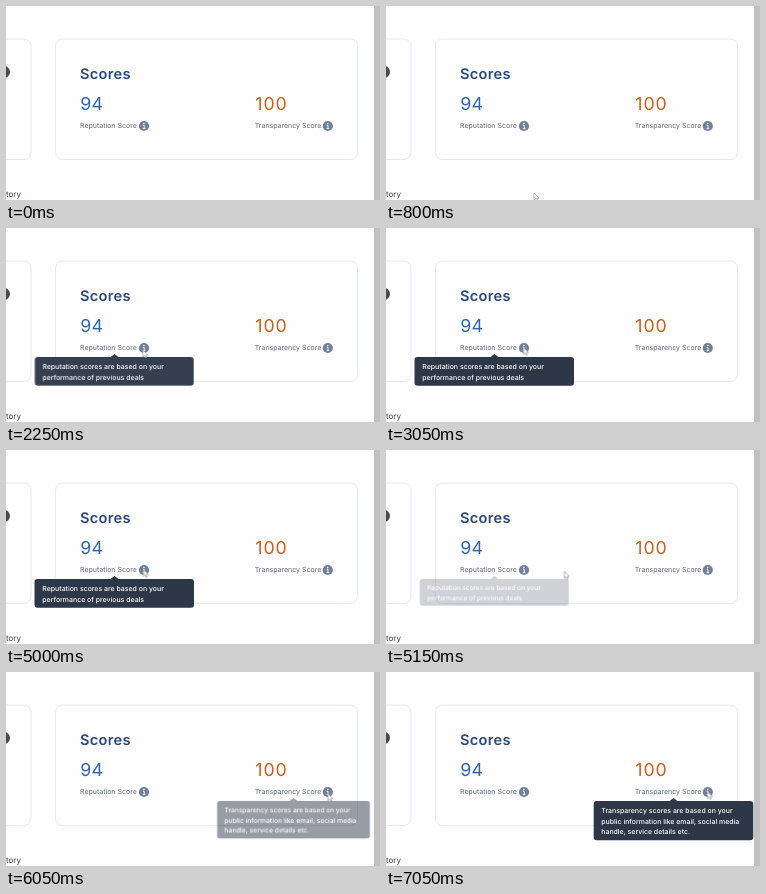
These frames come from a looping animation (374x194 px, 8 s). An HTML page:

```html
<!DOCTYPE html>
<html lang="en">
<head>
<meta charset="utf-8">
<title>Scores</title>
<style>
html, body { margin: 0; width: 100%; height: 100%; overflow: hidden; background: #fefdff; }
svg { display: block; width: 374px; height: 194px; font-family: Inter, "Liberation Sans", sans-serif; text-rendering: geometricPrecision; }
.card { fill: #fefdff; stroke: #e6eaf3; }
.title { font-size: 14.6px; font-weight: 600; letter-spacing: .3px; fill: #2c4a78; }
.num { font-size: 17.8px; font-weight: 400; letter-spacing: .2px; fill: #2f66a8; }
.orange { letter-spacing: .9px; fill: #c8601f; }
.label { font-size: 7px; fill: #5d6778; }
.aside { font-size: 8px; fill: #3a4250; }
.tip { fill: #2d3748; opacity: 0; animation: 8s linear infinite; }
.tip text { font-size: 6.95px; font-weight: 500; fill: #fff; }
.rep { transform-origin: 108.5px 126px; animation-name: rep; }
.trans { transform-origin: 287.5px 126px; animation-name: trans; }
.cursor { fill: #fff; stroke: #85858a; stroke-width: .6; stroke-linejoin: round; animation: move 8s linear infinite; }

@keyframes rep {
  0%, 26% { opacity: 0; transform: scale(.915); animation-timing-function: ease-in-out; }
  28.5%, 63.1% { opacity: 1; transform: scale(1); animation-timing-function: ease-in-out; }
  65%, 100% { opacity: 0; transform: scale(.915); }
}
@keyframes trans {
  0%, 74.4% { opacity: 0; transform: scale(.915); animation-timing-function: ease-in-out; }
  76.9%, 100% { opacity: 1; transform: scale(1); }
}
@keyframes move {
  0%, 8% { transform: translate(150px, 198px); }
  10% { transform: translate(148px, 187px); }
  11% { transform: translate(147.5px, 183px); animation-timing-function: ease-in-out; }
  22% { transform: translate(136px, 129px); }
  26.25% { transform: translate(136px, 124px); animation-timing-function: ease-out; }
  32%, 62.6% { transform: translate(137.5px, 119.5px); animation-timing-function: ease-in-out; }
  68.1%, 70% { transform: translate(323px, 128px); }
  73.75% { transform: translate(322.5px, 125px); animation-timing-function: ease-out; }
  78%, 100% { transform: translate(321.5px, 119.5px); }
}
</style>
</head>
<body>
<svg viewBox="0 0 374 194">
  <defs>
    <g id="info">
      <circle r="5.1" fill="#718096"/>
      <circle cx="-.1" cy="-2.4" r=".8" fill="#fff"/>
      <path d="M-1.1-.6H.2V2.5M-1.2 2.6H1.4" fill="none" stroke="#fff" stroke-width=".9"/>
    </g>
  </defs>

  <rect x="368" width="6" height="194" fill="#c1c1c1"/>
  <rect class="card" x="-60" y="33" width="85" height="120.5" rx="7"/>
  <rect class="card" x="49.5" y="33" width="302" height="120.5" rx="7"/>
  <circle cx="-2" cy="66" r="6" fill="#4a4a4e"/>
  <text class="aside" x="15" y="191" text-anchor="end">tory</text>

  <text class="title" x="74" y="72.5">Scores</text>
  <text class="num" x="74.3" y="104.2">94</text>
  <text class="num orange" x="249.3" y="104.2">100</text>
  <text class="label" x="74" y="122.4">Reputation Score</text>
  <text class="label" x="248.7" y="122.4">Transparency Score</text>
  <use href="#info" x="138" y="120"/>
  <use href="#info" x="321.8" y="120"/>

  <g class="tip rep">
    <path d="M104 129.5l4.5-3.5 4.5 3.5z"/>
    <rect x="28.5" y="129" width="159.5" height="28.7" rx="3"/>
    <text x="36.3" y="141.1">Reputation scores are based on your</text>
    <text x="36.3" y="151.5">performance of previous deals</text>
  </g>
  <g class="tip trans">
    <path d="M283 129.5l4.5-3.5 4.5 3.5z"/>
    <rect x="207.7" y="129" width="159.6" height="39.3" rx="3"/>
    <text x="215.3" y="141.1">Transparency scores are based on your</text>
    <text x="215.3" y="151.5">public information like email, social media</text>
    <text x="215.3" y="161.9">handle, service details etc.</text>
  </g>

  <path class="cursor" d="M0 0V7L1.6 5.5 2.7 8 3.9 7.5 2.8 5.1H5z"/>
</svg>
</body>
</html>
```
